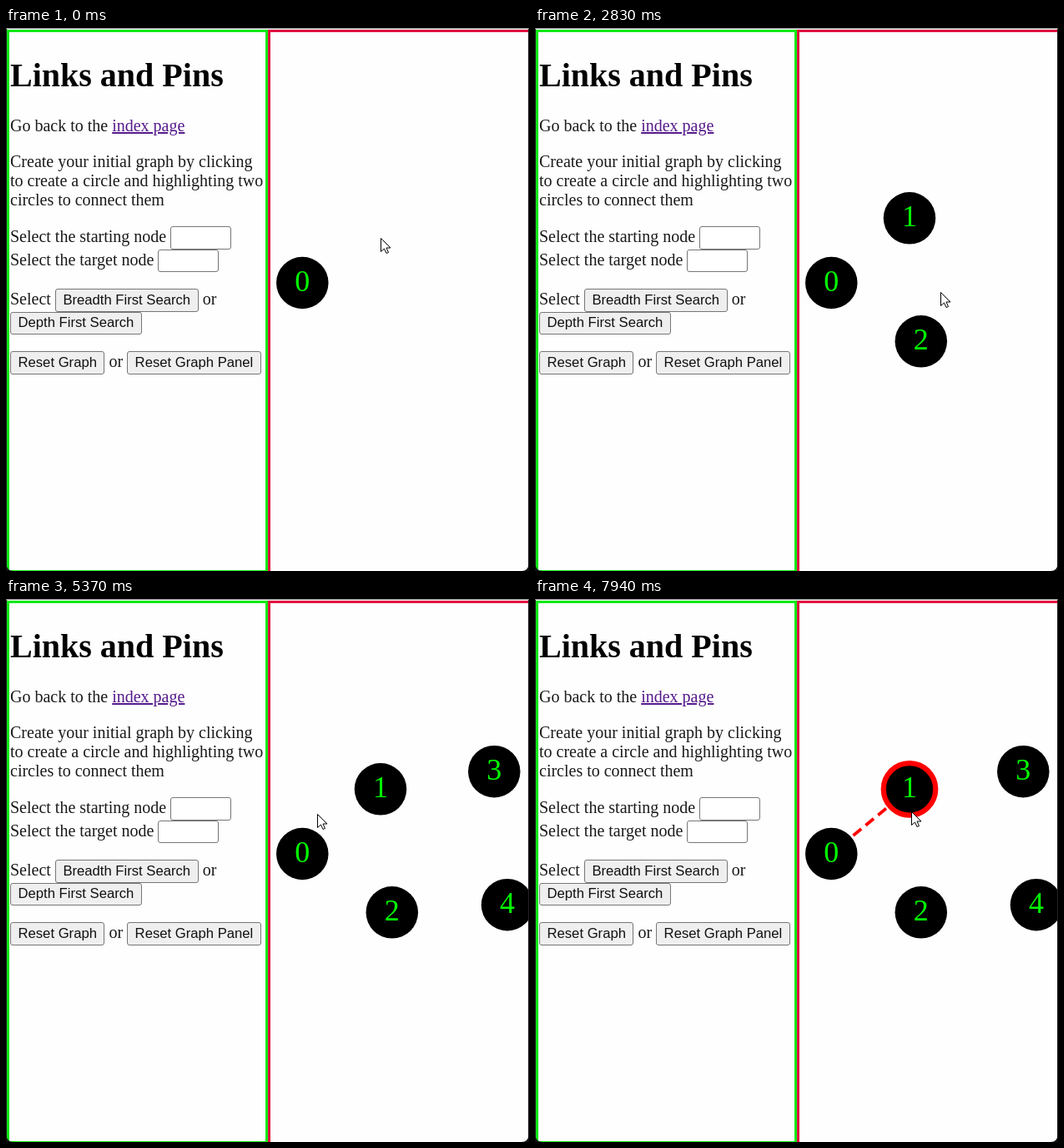
Recreate the animation shown at these times as an HTML page. Size 627x652 px, loop 8 s.

```html
<!DOCTYPE html>
<html lang="en">
<head>
<meta charset="utf-8">
<title>Links and Pins</title>
<style>
html, body { margin: 0; width: 100%; height: 100%; overflow: hidden; background: #fefefe; }
main {
  position: absolute; left: 1px; top: 2px; width: 306px; height: 646px;
  border: 3px solid #0be916; padding-left: 1px;
  font: 20px/23px "Liberation Serif", serif; color: #1a1a1a; white-space: nowrap;
}
h1 { font-size: 40px; line-height: 46px; margin: 29px 0 26px; color: #000; }
p { margin: 0 0 20px; }
a { color: #551a8b; text-decoration: underline; }
input, button {
  box-sizing: border-box; height: 27.5px; margin: 0; padding: 0 8.5px;
  border: 1px solid #767676; border-radius: 3px;
  font: 16.667px "Liberation Sans", sans-serif; color: #111; background: #efefef;
}
input { width: 73px; background: #fff; }
svg { position: absolute; left: 0; top: 0; }
svg text { font: 36px "Liberation Serif", serif; fill: #0f0; text-anchor: middle; }
</style>
</head>
<body>
<main>
  <h1>Links and Pins</h1>
  <p>Go back to the <a>index page</a></p>
  <p>Create your initial graph by clicking<br>to create a circle and highlighting two<br>circles to connect them</p>
  <p>Select the starting node <input><br>Select the target node <input></p>
  <p>Select <button>Breadth First Search</button> or<br><button>Depth First Search</button></p>
  <p><button>Reset Graph</button> or <button>Reset Graph Panel</button></p>
</main>
<svg width="627" height="652">
  <path d="M0 .5H627" stroke="#888"/>
  <path d="M.5 1V652M626.5 1V652" stroke="#222"/>
  <path d="M315.5 652V3.5H626" fill="none" stroke="#e01040" stroke-width="3"/>
  <path d="M0 643Q1 652 9 652H0ZM627 643Q626 652 618 652H627Z" fill="#111"/>
  <clipPath id="panel"><rect x="317" y="5" width="309" height="647"/></clipPath>
  <g clip-path="url(#panel)">
    <path id="edge" d="M381.5 284L421 251.5" stroke="red" stroke-width="3.75" stroke-dasharray="12.5 6.8"/>
    <g id="graph"></g>
    <g id="cursor" fill="#fff">
      <path id="arrow" d="M-1 0v16l4-3.5 2.5 5.5 2.5-1-2.5-5.5h5z" stroke="#000"/>
      <path id="beam" d="M-3.5-7H3.5M0-7V7M-3.5 7H3.5" stroke="#fff"/>
    </g>
  </g>
</svg>
<script>
const LOOP = 8000, STEP = 134.6, OFFSET = 28;
const $ = id => document.getElementById(id);
const centers = [[355.3, 306], [449, 228.3], [462.8, 376.3], [585.3, 207.2], [601, 367.2]];

// The first click on a node creates it, the next one selects it.
const clicks = [[1, 9], [2, 17], [3, 28], [4, 35], [0, 43], [1, 56]]
  .map(([node, step]) => ({ node, step }));
const LINK_STEP = 49;

$('graph').innerHTML = centers.map(([x, y], i) => `<g>
  <circle cx="${x}" cy="${y}" r="31.25" stroke-width="6.25"/>
  <text x="${x}" y="${y + 9.7}">${i}</text></g>`).join('');
const nodes = centers.map(([x, y], i) => {
  const steps = clicks.filter(c => c.node === i).map(c => c.step);
  const [born, selected = Infinity] = i ? steps : [0, ...steps];
  const group = $('graph').children[i];
  return { x, y: y - 3, born, selected, group, ring: group.firstElementChild };
});

// The cursor rests around each click and passes a few points on the way.
const path = [
  [0, 450, 252], [4, 419, 236], [14, 448, 367], [21, 487, 317], [33, 589, 365],
  [40, 374, 258], [49, 437, 244], [53, 441, 244], [59, 452, 255]
].map(([step, x, y]) => ({ step, x, y }));
for (const { node, step } of clicks) {
  const { x, y } = nodes[node];
  path.push({ step: step - 1, x, y }, { step: step + 1, x, y });
}
path.sort((a, b) => a.step - b.step);

const cursorAt = step => {
  const i = Math.max(1, path.findIndex(p => p.step >= step));
  const a = path[i - 1], b = path[i];
  const k = (step - a.step) / (b.step - a.step);
  return [a.x + (b.x - a.x) * k, a.y + (b.y - a.y) * k].map(Math.round);
};
const show = (el, visible) => el.setAttribute('visibility', visible ? 'visible' : 'hidden');

function draw(now) {
  const step = Math.floor((now % LOOP + OFFSET) / STEP);
  const [x, y] = cursorAt(step);
  const linked = step >= LINK_STEP;
  let overDigit = false;
  for (const n of nodes) {
    const exists = step >= n.born;
    const ringed = step >= n.selected && (n.selected > LINK_STEP || !linked);
    show(n.group, exists);
    n.ring.setAttribute('stroke', ringed ? 'red' : 'none');
    overDigit ||= exists && Math.abs(x - n.x) < 9 && Math.abs(y - n.y) < 21;
  }
  show($('edge'), linked);
  show($('arrow'), !overDigit);
  show($('beam'), overDigit);
  $('cursor').setAttribute('transform', `translate(${x + .5} ${y + .5})`);
  requestAnimationFrame(draw);
}
draw(performance.now());
</script>
</body>
</html>
```
